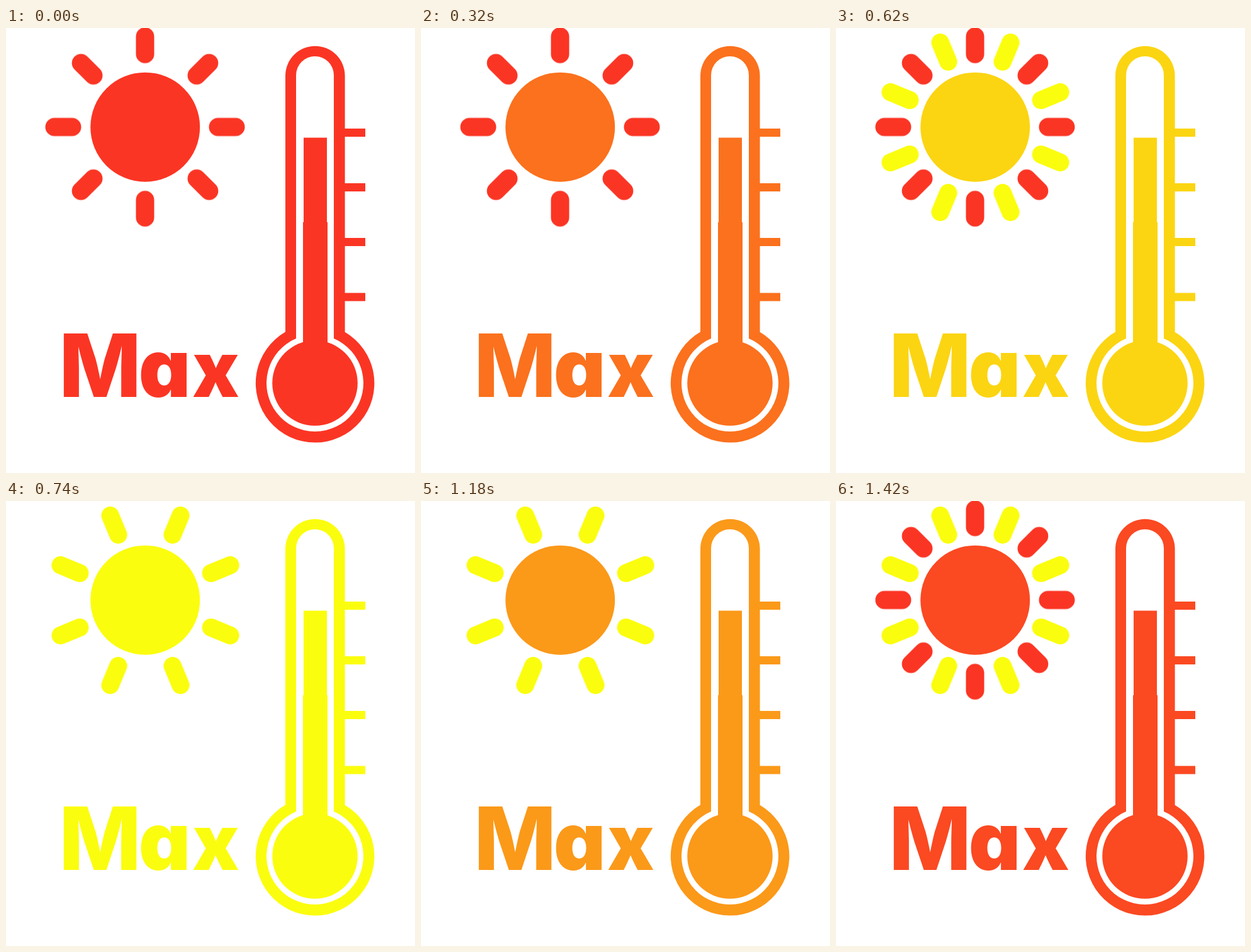
An HTML page without scripts for the animation above (1.48 s loop, 650 by 708 pixels).

```html
<!DOCTYPE html>
<html lang="en">
<head>
<meta charset="utf-8">
<title>Max temperature</title>
<style>
  :root {
    --hot: rgb(251, 53, 36);
    --warm: rgb(251, 253, 14);
    --loop: 1480ms;
  }
  html, body {
    margin: 0;
    width: 100%;
    height: 100%;
    overflow: hidden;
    background: #fff;
  }
  svg {
    display: block;
    width: 650px;
    height: 708px;
    fill: currentColor;
    animation: heat var(--loop) -1ms infinite;
  }
  .rays {
    fill: none;
    stroke-linecap: round;
    animation: var(--loop) step-end -1ms infinite;
  }
  .hot { stroke: var(--hot); stroke-width: 29px; animation-name: hot-rays; }
  .warm { stroke: var(--warm); stroke-width: 28.5px; animation-name: warm-rays; }
  text {
    font: 800 139px Inter, sans-serif;
    font-feature-settings: "cv11";
    text-anchor: middle;
  }
  .small { font-size: 128px; font-weight: 900; }
  .narrow { font-size: 122px; }

  /* Ten colour steps of 60 ms each way, with a pause at both ends */
  @keyframes heat {
    0% { color: var(--hot); }
    9.4595% { color: var(--hot); animation-timing-function: steps(10, end); }
    50% { color: var(--warm); }
    59.4595% { color: var(--warm); animation-timing-function: steps(10, end); }
    100% { color: var(--hot); }
  }
  @keyframes hot-rays {
    0% { opacity: 1; }
    50% { opacity: 0; }
    83.7838%, 100% { opacity: 1; }
  }
  @keyframes warm-rays {
    0% { opacity: 0; }
    33.7838%, 100% { opacity: 1; }
  }
</style>
</head>
<body>
<svg viewBox="0 0 650 708">
  <defs>
    <path id="hot-cross" d="M116 0H144M-116 0H-144M0 116V144M0-116V-144"/>
    <path id="warm-cross" d="M113 0H146M-113 0H-146M0 113V146M0-113V-146"/>
    <path id="tick" d="M537 0H571V13H537Z"/>
  </defs>

  <g transform="translate(221 157.5)">
    <circle cx=".2" cy=".2" r="87"/>
    <g class="rays hot">
      <use href="#hot-cross"/>
      <use href="#hot-cross" transform="rotate(45)"/>
    </g>
    <g class="rays warm" transform="translate(.5 .5)">
      <use href="#warm-cross" transform="rotate(22.5)"/>
      <use href="#warm-cross" transform="rotate(67.5)"/>
    </g>
  </g>

  <g>
    <path fill-rule="evenodd" d="M444 483.6V76a47.3 47.3 0 0 1 94.6 0V483.8A94.3 94.3 0 1 1 444 483.6Z
      M461 494.1V75a30 30 0 0 1 60 0V494.1A77 77 0 1 1 461 494.1Z"/>
    <path d="M473 174.5H510V309H511V510H472V309H473Z"/>
    <circle cx="491" cy="565" r="67.8"/>
    <use href="#tick" y="160"/>
    <use href="#tick" y="247"/>
    <use href="#tick" y="334"/>
    <use href="#tick" y="421.5"/>
  </g>

  <text y="587"><tspan x="149.5">M</tspan><tspan class="small" x="252">a</tspan><tspan class="small narrow" x="333.5">x</tspan></text>
</svg>
</body>
</html>
```
